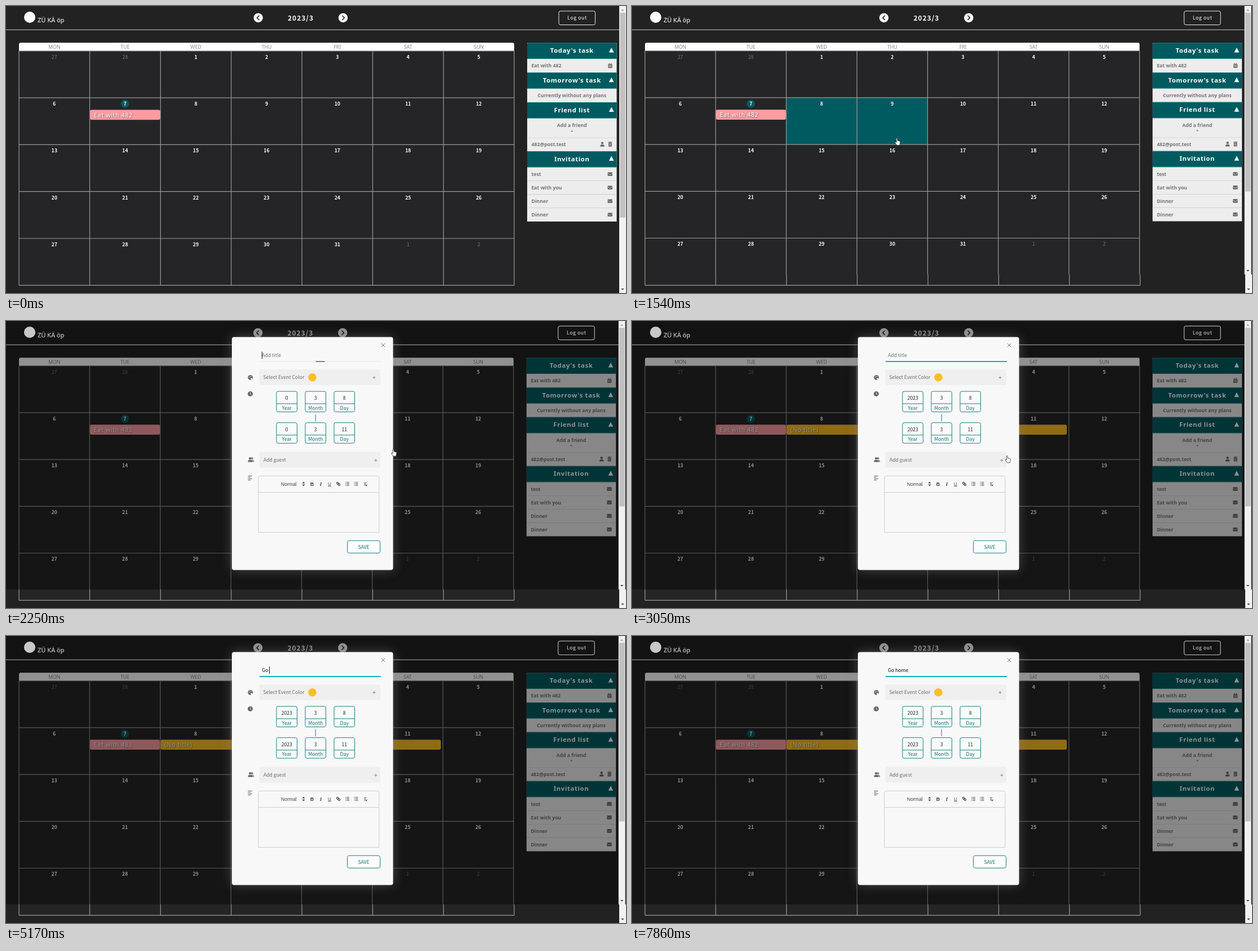
An HTML page with a canvas for the animation above (8 s loop, 1098 by 510 pixels).

```html
<!DOCTYPE html>
<html lang="en">
<head>
<meta charset="utf-8">
<title>Calendar</title>
<style>
html, body { margin: 0; width: 100%; height: 100%; overflow: hidden; background: #222; }
canvas { display: block; }
</style>
</head>
<body>
<canvas id="stage" width="1098" height="510"></canvas>
<script>
const ctx = document.getElementById('stage').getContext('2d');
const SANS = '"Noto Sans", "Open Sans", sans-serif';
const CJK = '"Noto Sans CJK TC", "Noto Sans CJK JP", "Noto Sans CJK SC", "Noto Sans", sans-serif';
const ARIAL = '"Liberation Sans", Arial, sans-serif';
const TEAL = '#005b60', EDGE = '#1b7f86', ICON = '#666', GRID = '#9a9a9a';
const LOOP = 8000, VIEW_BOTTOM = 477, SHRINK = 0.9988;
const OPENED = 2250, FILLED = 2320;

function text(str, x, y, { size = 8.6, weight = 400, font = CJK, color = '#fff', align = 'left', gap = 0, style = '' } = {}) {
  ctx.font = `${style} ${weight} ${size}px ${font}`;
  ctx.letterSpacing = gap + 'px';
  ctx.textAlign = align;
  ctx.fillStyle = color;
  ctx.fillText(str, x, y + size * 0.36);
}

function box(x, y, w, h, fill, stroke, radius = 0) {
  ctx.beginPath();
  ctx.roundRect(x, y, w, h, radius);
  if (fill) { ctx.fillStyle = fill; ctx.fill(); }
  if (stroke) { ctx.strokeStyle = stroke; ctx.lineWidth = 1; ctx.stroke(); }
}

function disc(x, y, r, color) {
  ctx.beginPath();
  ctx.arc(x, y, r, 0, Math.PI * 2);
  ctx.fillStyle = color;
  ctx.fill();
}

function line(points, color, width = 1) {
  ctx.beginPath();
  points.forEach(([x, y]) => ctx.lineTo(x, y));
  ctx.strokeStyle = color;
  ctx.lineWidth = width;
  ctx.stroke();
}

function shape(points, color) {
  ctx.beginPath();
  points.forEach(([x, y]) => ctx.lineTo(x, y));
  ctx.fillStyle = color;
  ctx.fill();
}

const triangle = (x, y, w, h, color) => shape([[x - w / 2, y], [x + w / 2, y], [x, y - h]], color);

// Icons are centred on x, y.
const icons = {
  calendar(x, y) {
    box(x - 3.7, y - 3, 7.4, 7.2, ICON, null, 1);
    box(x - 2.3, y - 4.3, 1.2, 2, ICON);
    box(x + 1.1, y - 4.3, 1.2, 2, ICON);
    line([[x - 3.7, y - 0.9], [x + 3.7, y - 0.9]], '#ededed', 0.7);
    line([[x - 3, y + 1.6], [x + 3, y + 1.6]], '#ededed', 0.5);
    for (const dx of [-1.2, 1.2]) line([[x + dx, y - 0.5], [x + dx, y + 3.6]], '#ededed', 0.5);
  },
  person(x, y, color = ICON) {
    disc(x, y - 2, 2.1, color);
    box(x - 3.7, y + 0.8, 7.4, 3.4, color, null, [2.6, 2.6, 0.6, 0.6]);
  },
  trash(x, y) {
    box(x - 3.6, y - 3.8, 7.2, 1.1, ICON);
    box(x - 1.2, y - 4.5, 2.4, 1, ICON);
    box(x - 3, y - 2.2, 6, 6.6, ICON, null, 0.8);
    for (const dx of [-1.4, 0, 1.4]) line([[x + dx, y - 1], [x + dx, y + 3.2]], '#ededed', 0.5);
  },
  envelope(x, y) {
    box(x - 4.2, y - 3.3, 8.4, 6.6, ICON, null, 1);
    line([[x - 4.2, y - 1.5], [x, y + 1.2], [x + 4.2, y - 1.5]], '#ededed', 0.7);
  },
};

function brand() {
  disc(42, 20, 10, '#fff');
  text('ZÜ KÄ öp', 56, 25, { size: 11, weight: 300, font: SANS });
}

function logout() {
  box(979, 9, 64.5, 24.5, null, '#eee', 3);
  text('Log out', 1011.5, 21, { size: 8.7, weight: 500, gap: 0.57, align: 'center' });
}

function navLine() {
  box(0, 41.8, 1086, 1, '#c8c8c8');
}

const COL = 125.28, ROW = 83.3, LEFT = 23, TOP = 79.8;

function eventBar(label, x, width, color) {
  box(x, 184.5, width, 17.7, color, null, 3);
  ctx.save();
  ctx.shadowColor = 'rgba(60,60,60,.7)';
  ctx.shadowBlur = 2;
  ctx.shadowOffsetX = ctx.shadowOffsetY = 1;
  text(label, x + 7, 194, { size: 10.3, weight: 500, font: SANS, gap: 0.8 });
  ctx.restore();
}

function calendar(selected, hasNewEvent) {
  box(LEFT, TOP, COL * 7, ROW * 5, '#252527');
  box(LEFT + COL * 2, TOP + ROW, COL * selected, ROW, TEAL);
  box(LEFT, 65.3, COL * 7, 14.7, '#fff', null, [3, 3, 0, 0]);
  for (let c = 0; c <= 7; c++) box(LEFT + c * COL - 0.6, TOP, 1.2, ROW * 5, GRID);
  for (let r = 0; r <= 5; r++) box(LEFT, TOP + r * ROW - 0.6, COL * 7, 1.2, GRID);
  ['MON', 'TUE', 'WED', 'THU', 'FRI', 'SAT', 'SUN'].forEach((day, c) =>
    text(day, LEFT + (c + 0.5) * COL, 72.6, { size: 8.7, color: '#888', font: SANS, align: 'center' }));
  disc(210.8, 173.9, 7.3, TEAL);
  for (let i = 0; i < 35; i++) {
    const day = i - 1, inMonth = day >= 1 && day <= 31;
    const label = day < 1 ? day + 28 : day > 31 ? day - 31 : day;
    text(label, LEFT + (i % 7 + 0.5) * COL, 90.5 + Math.floor(i / 7) * ROW,
      { size: 8.7, weight: inMonth ? 600 : 400, color: inMonth ? '#fff' : '#777', align: 'center' });
  }
  eventBar('Eat with 482', 148.8, 124.2, '#fb9ca1');
  if (hasNewEvent) eventBar('(No title)', 274, 497, '#fcbb24');
}

function sidebar() {
  const x = 923, w = 158.5, mid = x + w / 2;
  const item = { size: 8.7, weight: 600, font: SANS, color: '#757575' };
  const centred = { ...item, align: 'center' };
  box(x, 66, w, 317, '#ededed');
  [["Today's task", 65.5], ["Tomorrow's task", 118.3], ['Friend list', 171], ['Invitation', 258]].forEach(([title, y], i) => {
    box(x, y, w, 28.5, TEAL, null, i ? 0 : [3, 3, 0, 0]);
    box(x, y, w, 0.8, '#2a868a');
    box(x, y + 27.7, w, 0.8, '#2a868a');
    text(title, mid, y + 13.6, { size: 11.4, weight: 600, font: SANS, gap: 0.6, align: 'center' });
    triangle(1072.2, y + 17, 8.6, 8.4, '#fff');
  });
  text('Eat with 482', 930.5, 106, item);
  icons.calendar(1070, 106);
  text('Currently without any plans', mid, 158.7, centred);
  text('Add a friend', mid, 212, centred);
  text('+', mid, 222, { ...centred, size: 7.5 });
  text('482@post.test', 930.5, 245.7, item);
  icons.person(1056, 245.5);
  icons.trash(1070, 245.5);
  ['test', 'Eat with you', 'Dinner', 'Dinner'].forEach((label, i) => {
    text(label, 930.5, 299 + i * 24, item);
    icons.envelope(1069.7, 298.8 + i * 24);
  });
  for (const y of [233.7, 310.3, 334.3, 358.3]) box(x, y, w, 0.9, '#cfcfcf');
}

function scrollbar(height, thumbEnd) {
  box(1086, 0, 12, height, '#f1f1f1');
  box(1087.3, 12, 9.6, thumbEnd - 12, '#c1c1c1');
  triangle(1092, 8.5, 5.5, 3, '#a0a0a0');
  triangle(1092, height - 8, 5.5, -3, '#505050');
}

function page(selected, hasNewEvent, barHeight, thumbEnd) {
  box(0, 0, 1100, 512, '#222');
  navLine();
  brand();
  for (const [x, dir] of [[446.7, 1], [597, -1]]) {
    disc(x, 21, 8.2, '#fff');
    line([[x + 1.8 * dir, 17], [x - 2.2 * dir, 21], [x + 1.8 * dir, 25]], '#222', 1.7);
  }
  text('2023/3', 522, 21.6, { size: 12, weight: 700, gap: 1, align: 'center' });
  logout();
  calendar(selected, hasNewEvent);
  sidebar();
  scrollbar(barHeight, thumbEnd);
}

function dateBoxes(year, day, y) {
  [[year, 'Year', 479], [3, 'Month', 530], [day, 'Day', 581]].forEach(([value, label, x]) => {
    box(x, y, 36.5, 36.5, '#fafafa', EDGE, 3);
    box(x, y + 21.5, 36.5, 1, EDGE);
    text(value, x + 18.2, y + 11.8, { color: '#222', align: 'center' });
    text(label, x + 18.2, y + 29.5, { color: '#0f7278', align: 'center' });
  });
}

function toolbar() {
  const ink = '#444', y = 289.5;
  const glyph = { size: 9, font: ARIAL, color: ink, align: 'center' };
  text('Normal', 487, y, { ...glyph, weight: 500, size: 8.6, align: 'left' });
  triangle(527, 288.6, 5, 3, ink);
  triangle(527, 290.4, 5, -3, ink);
  text('B', 542, y, { ...glyph, weight: 700 });
  text('I', 557.5, y, { ...glyph, weight: 700, style: 'italic', font: '"Liberation Serif", serif' });
  text('U', 573, y - 0.6, { ...glyph, size: 8 });
  line([[570, 293.3], [576, 293.3]], ink);
  ctx.save();
  ctx.translate(588.5, y);
  ctx.rotate(Math.PI / 4);
  ctx.lineWidth = 1.2;
  for (const dx of [-3.6, -0.4]) {
    ctx.beginPath();
    ctx.roundRect(dx, -1.5, 4, 3, 1.4);
    ctx.strokeStyle = ink;
    ctx.stroke();
  }
  ctx.restore();
  for (const x of [604.5, 620]) {
    for (const dy of [-2.7, 0, 2.7]) {
      line([[x - 1.5, y + dy], [x + 3.5, y + dy]], ink);
      box(x - 3.6, y + dy - 0.5, 1.2, 1, ink);
    }
  }
  text('T', 635.5, y, { ...glyph, style: 'italic' });
  line([[636.5, 290.5], [639.5, 293.3]], ink);
  line([[639.5, 290.5], [636.5, 293.3]], ink);
}

// Time, text typed so far, caret visible.
const typing = [
  [2250, '', 1], [2750, '', 0], [3270, '', 1], [3770, 'G', 1], [4260, 'G', 0], [4680, 'Go', 1],
  [5170, 'Go ', 1], [5570, 'Go ', 0], [5890, 'Go h', 1], [6480, 'Go h', 0], [6550, 'Go ho', 1],
  [6800, 'Go hom', 1], [7290, 'Go home', 1], [7860, 'Go home', 0],
];

function titleField(t) {
  const [, typed, caret] = typing.findLast(step => t >= step[0]);
  text(typed || 'Add title', 453.3, 61, { color: typed ? '#111' : '#647774' });
  if (caret) box(453 + (typed ? ctx.measureText(typed).width : 0), 54.5, 1, 12.5, '#111');
  box(449, 71.5, 215, 0.8, '#e2e2e2');
  const grow = Math.min(1, (t - OPENED) / 400);
  const half = 7.5 + 100 * (1 - (1 - grow) ** 2);
  box(556.5 - half, 71, half * 2, 2, '#12b0bf');
}

function modal(t) {
  const grey = '#6b6b6b', year = t < FILLED ? 0 : 2023;
  ctx.save();
  ctx.shadowColor = 'rgba(150,150,150,.4)';
  ctx.shadowBlur = 20;
  box(400, 28.5, 285.5, 414, '#f8f8f8', null, 4);
  ctx.restore();
  line([[664.7, 39.7], [671.2, 46.2]], '#777');
  line([[671.2, 39.7], [664.7, 46.2]], '#777');
  titleField(t);

  disc(432.8, 100.3, 4.4, ICON);
  for (const [dx, dy] of [[-2, 0], [-0.8, -2], [1.5, -1.6]]) disc(432.8 + dx, 100.3 + dy, 0.7, '#f8f8f8');
  disc(434.8, 102.8, 1.5, '#f8f8f8');
  box(448.5, 86, 214.5, 28, '#efefef', null, 2);
  text('Select Event Color', 455.5, 100.3, { color: grey });
  disc(542.5, 100.2, 7.3, '#fbbf24');
  text('+', 652, 100, { size: 10.5, color: grey, align: 'center' });

  disc(432.6, 129.4, 4.5, ICON);
  line([[432.6, 126.6], [432.6, 129.6], [434.6, 130.9]], '#f8f8f8', 0.9);
  dateBoxes(year, 8, 125);
  box(547.7, 166, 1, 12.3, EDGE);
  dateBoxes(year, 11, 180.7);

  icons.person(435.7, 246.2, '#8a8a8a');
  icons.person(432.2, 246.2, ICON);
  box(448.5, 232.5, 214.5, 28, '#efefef', null, 2);
  text('Add guest', 456, 247.3, { color: grey });
  text('+', 654.8, 247, { size: 10.5, color: grey, align: 'center' });

  [7.5, 4.5, 7.5, 5].forEach((w, i) => box(428.5, 275 + i * 2.4, w, 1, ICON));
  box(447, 275.3, 213.7, 100.3, null, '#ccc', [3, 3, 0, 0]);
  box(447, 304, 213.7, 1, '#ccc');
  toolbar();

  box(604.5, 390.3, 58, 22, '#fcfcfc', EDGE, 3);
  text('SAVE', 633.5, 401.7, { color: '#0f7278', weight: 500, align: 'center' });
}

// Pointer keys: time, left, top.
const pointerPath = [
  [200, 560, 455], [650, 328, 219], [789, 328, 219], [790, 322, 218], [1200, 322, 218], [1600, 490, 237],
  [2010, 681, 229], [2080, 682, 227], [2280, 682, 227], [2800, 663, 236], [3040, 663, 236], [3120, 645, 255],
];

function pointerAt(t) {
  const next = pointerPath.findIndex(key => key[0] > t);
  if (next < 0) return pointerPath.at(-1).slice(1);
  const [t0, x0, y0] = pointerPath[Math.max(0, next - 1)];
  const [t1, x1, y1] = pointerPath[next];
  const k = t1 > t0 ? (t - t0) / (t1 - t0) : 0;
  return [x0 + (x1 - x0) * k, y0 + (y1 - y0) * k];
}

function hand(x, y) {
  ctx.save();
  ctx.translate(x, y);
  const outline = new Path2D('M2.6 1.4Q3.6 0 4.6 1.3L5 5.2Q6 4.5 6.7 5.5Q7.7 5 8.2 6Q9.7 5.7 9.8 7.3L9.2 10.6L8.6 13.2H4L1.6 10L.4 8Q.7 6.8 2 7.5L3.2 8.4Z');
  ctx.fillStyle = '#fff';
  ctx.strokeStyle = '#333';
  ctx.lineWidth = 0.8;
  ctx.fill(outline);
  ctx.stroke(outline);
  ctx.restore();
}

function draw(t) {
  page(0, false, 510, 376);
  if (t < 120) return;

  // The shortened viewport leaves the strip below it unchanged.
  const [px, py] = pointerAt(t);
  const open = t >= OPENED;
  const selected = t >= 1210 && !open ? Math.floor((px + 3 - LEFT) / COL) - 1 : 0;
  ctx.save();
  ctx.beginPath();
  ctx.rect(0, 0, 1098, VIEW_BOTTOM);
  ctx.clip();
  ctx.save();
  ctx.scale(SHRINK, SHRINK);
  page(selected, t >= FILLED, VIEW_BOTTOM / SHRINK, 330);
  if (open) {
    box(0, 0, 1086, VIEW_BOTTOM + 1, 'rgba(0,0,0,.43)');
    ctx.globalAlpha = 0.5;
    navLine();
    brand();
    logout();
  }
  ctx.restore();
  if (open) modal(t);
  if (t >= 200 && t < 5080) hand(px, py);
  ctx.restore();
}

function tick() {
  draw(performance.now() % LOOP);
  requestAnimationFrame(tick);
}
tick();
</script>
</body>
</html>
```
